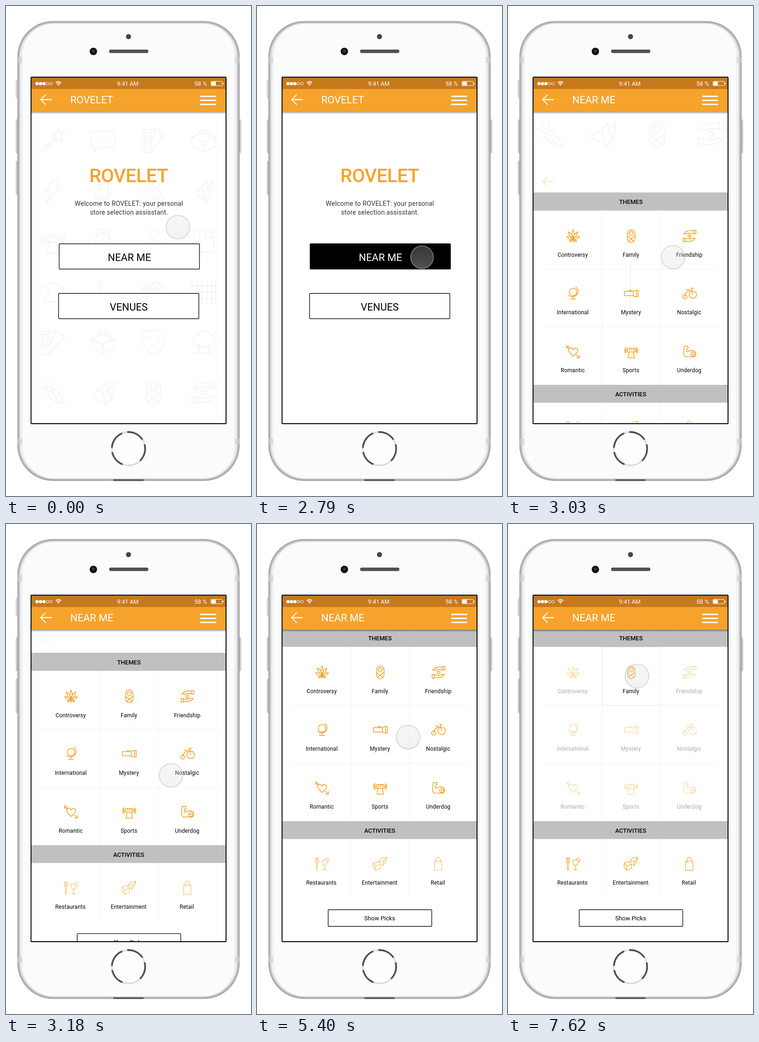
These frames come from a looping animation (530 px wide and 1057 px high, 8 s). An HTML page:

```html
<!DOCTYPE html>
<html lang="en">
<head>
<meta charset="utf-8">
<title>Store finder</title>
<style>
html, body { margin: 0; height: 100%; overflow: hidden; background: #fff; }
svg { display: block; width: 100vw; height: 100vh; font-family: Roboto, Inter, sans-serif; }
.mid { text-anchor: middle; }
.line { fill: none; stroke-linecap: round; stroke-linejoin: round; }
.line path { vector-effect: non-scaling-stroke; }
.label { font-size: 12px; letter-spacing: .15px; }
.section { font-size: 13px; font-weight: 500; }
</style>
</head>
<body>
<svg viewBox="0 0 530 1057">
  <defs>
    <clipPath id="view"><rect x="55" y="228" width="420" height="672"/></clipPath>
    <clipPath id="body"><rect x="24.5" y="32.5" width="481" height="992" rx="77"/></clipPath>
    <filter id="soft"><feGaussianBlur stdDeviation="2.2"/></filter>
    <filter id="polish"><feGaussianBlur stdDeviation=".7"/></filter>
    <linearGradient id="shade" x2="0" y2="1">
      <stop offset="0" stop-color="#000" stop-opacity=".38"/><stop offset="1" stop-color="#000" stop-opacity="0"/>
    </linearGradient>
    <linearGradient id="glass" x2="0" y2="1">
      <stop offset="0" stop-color="#ddd" stop-opacity=".25"/><stop offset="1" stop-color="#ddd" stop-opacity=".36"/>
    </linearGradient>
    <path id="back" d="M99 202H75M86 191L75 202L86 213" fill="none" stroke-width="2.3"/>
  </defs>

  <g fill="#e4e4e6" stroke="#a9a9ab">
    <rect x="22" y="160" width="6" height="38" rx="2"/>
    <rect x="22" y="245" width="6" height="72" rx="2"/>
    <rect x="22" y="334" width="6" height="73" rx="2"/>
    <rect x="502" y="245" width="6" height="72" rx="2"/>
  </g>
  <path d="M24.5 246V316M24.5 335V406M505.5 246V316" stroke="#666"/>
  <g clip-path="url(#body)">
    <rect x="24.5" y="32.5" width="481" height="992" fill="#f4f4f5"/>
    <rect x="25" y="33" width="480" height="991" rx="77" fill="none" stroke="#a2a2a4" stroke-width="8" filter="url(#soft)"/>
    <path d="M25 110h11v14H25zM494 110h11v14h-11zM25 933h11v13H25zM494 933h11v13h-11z" fill="#cfcfd1" opacity=".6"/>
  </g>
  <rect x="35.5" y="38" width="459" height="981" rx="68" fill="#fafbfd" stroke="#ececee"/>
  <rect x="232" y="1021" width="66" height="3.5" rx="1.5" fill="#555"/>
  <circle cx="265" cy="66" r="5.5" fill="#454547"/>
  <circle cx="189" cy="98" r="8" fill="#111"/>
  <circle cx="189" cy="97" r="3" fill="#3a3a42"/>
  <rect x="223" y="94" width="85" height="7.5" rx="3.7" fill="#505052"/>
  <g fill="none" stroke-width="3.6">
    <circle cx="265" cy="955" r="36" fill="#fdfdff" stroke="#dcdcdd"/>
    <circle cx="265" cy="955" r="36" stroke="#4a4a4c" pathLength="100" stroke-dasharray="17 18 16 4 18 5 17 5"
      transform="rotate(-15 265 955)" filter="url(#polish)"/>
  </g>
  <rect x="54" y="153" width="422" height="748" fill="#fff"/>

  <g clip-path="url(#view)">
    <g id="home">
      <g id="pattern" class="line" stroke="#f4f4f4" stroke-width="2"></g>
      <text class="mid" x="265.5" y="380" font-size="41" font-weight="500" letter-spacing="-.5" fill="#f5a32c">ROVELET</text>
      <g class="mid" font-size="14" letter-spacing=".2" fill="#333">
        <text x="266" y="431">Welcome to ROVELET: your personal</text>
        <text x="266" y="450">store selection assisstant.</text>
      </g>
      <g class="mid" font-size="22">
        <rect x="115" y="513" width="303.5" height="54.5" rx="1.5" fill="#fff" stroke="#111" stroke-width="1.4"/>
        <text x="267" y="550">NEAR ME</text>
        <g id="pressed">
          <rect x="114.5" y="512.5" width="304.5" height="55.5" rx="1.5"/>
          <text x="267" y="550" fill="#fff">NEAR ME</text>
        </g>
        <rect x="113.7" y="620" width="303.5" height="54.5" rx="1.5" fill="#fff" stroke="#111" stroke-width="1.4"/>
        <text x="265.5" y="657">VENUES</text>
      </g>
    </g>
    <g id="near">
      <g id="ghost">
        <use href="#back" stroke="#f5a32c"/>
      </g>
      <path d="M55 226h420v39H55zM55 641h420v38.5H55z" fill="#c0c0c0"/>
      <g class="mid section">
        <text x="266" y="251">THEMES</text>
        <text x="265.5" y="666">ACTIVITIES</text>
      </g>
      <path d="M203.5 265V641M329.5 265V641M202.5 680V803M328.5 680V803M76 391H455M76 516H455" stroke="#f0f0f0" fill="none"/>
      <path id="streak" d="M265 376V473" stroke="#eee" stroke-width="2"/>
      <rect id="chosen" x="204" y="265.5" width="125.5" height="125.5" fill="none" stroke="#e8e8e8"/>
      <g id="tiles" class="mid label"></g>
      <rect x="154" y="832" width="224" height="36" rx="1.5" fill="#fff" stroke="#111" stroke-width="1.4"/>
      <text class="mid" x="265.5" y="855" font-size="13">Show Picks</text>
    </g>
    <rect x="55" y="228" width="420" height="5" fill="url(#shade)"/>
  </g>

  <rect x="55" y="154" width="420" height="25.5" fill="#c7791d"/>
  <rect x="55" y="179" width="420" height="49" fill="#f5a32c"/>
  <g fill="#fff">
    <circle cx="67" cy="167.5" r="3.5"/><circle cx="74.5" cy="167.5" r="3.5"/><circle cx="82" cy="167.5" r="3.5"/>
    <g fill="none" stroke="#fff">
      <circle cx="89.7" cy="167.5" r="3"/><circle cx="97.5" cy="167.5" r="3"/>
      <path d="M107.5 165.5Q113.5 160.5 119.5 165.5M109.7 168Q113.5 165 117.3 168" stroke-width="1.7"/>
      <rect x="443.5" y="162.5" width="24.5" height="9.5" rx="1.5"/>
    </g>
    <path d="M111.5 169.5Q113.5 168 115.5 169.5L113.5 172ZM444.5 163.5H454V171H444.5ZM469 165.5h1.5v4H469z"/>
    <text class="mid" x="263.5" y="172" font-size="12.5">9:41 AM</text>
    <text x="407.5" y="172" font-size="13">58 %</text>
    <g font-size="22">
      <text id="title1" x="139" y="209.5">ROVELET</text>
      <text id="title2" x="139" y="209.5">NEAR ME</text>
    </g>
    <path d="M420 193.5h34.500v3H420zM420 202h34.500v3H420zM420 210.700h34.500v3H420z"/>
  </g>
  <use href="#back" stroke="#fff3e0"/>
  <rect x="54.2" y="153.5" width="421.8" height="747.5" rx="1" fill="none" stroke="#000" stroke-width="2"/>
  <g id="touch">
    <circle r="25.5" fill="url(#glass)" stroke="#bdbdbd" stroke-opacity=".5" stroke-width="2.2"/>
  </g>
</svg>
<script>
const $ = id => document.getElementById(id);

// Line icons, drawn around the origin within about 12 units
const icons = {
  wand: 'M-12 11L3-4M-10 12L5-2M6-12L7.5-7.5L12-8L8.5-4.5L10 1L5.5-2L1 0L2.5-4.5L-1-8L4-8Z',
  speech: 'M-12-9H12V7H-4L-9 11V7H-12ZM-5-1h1M0-1h1M5-1h1',
  swatch: 'M-11-11H-3V12H-11ZM-9-8h4v5h-4ZM-9 0h4v5h-4ZM-3-10L3-12L12-6L-3 12M3-12L-3 3M-7 8v1',
  toolbox: 'M-12-3L0-8L12-3V6L0 11L-12 6ZM-12-3L0 2L12-3M0 2V11M-5-6V-9L0-11L6-9V-6M-3 1v3l3 1',
  bolt: 'M0-11H7L3-3H8L-6 12L-2 1H-8Z',
  mic: 'M-5-7a5 5 0 0 1 10 0V1a5 5 0 0 1-10 0ZM-8-1V1a8 8 0 0 0 16 0V-1M0 9V12M-4 12H4M-5-6h5M-5-2h5',
  popper: 'M-4 4Q-6-4 4-3L12 11Q6 12-4 4M-2-2L8 11M-12-4q4-2 6 3M-8-11l3 6M-1-11q2 3-1 6M-11 3l2 1',
  bird: 'M-12 2L-2-4L4-10L5-3L12-11L9 5L3 12ZM-2-4L3 12M5-3L9 5',
  sports: 'M-12-6V2M-10-8V4M10-8V4M12-6V2M-10-2H-7M7-2H10M-7-6H7V1H-7ZM-3-6V-2M0-6V-2M4-6V-2M-4 1L-6 12H6L4 1',
  watch: 'M-5-12H5L6-6M-5-12L-6-6M-5 12H5L6 6M-5 12L-6 6M8 0A8 8 0 1 1-8 0A8 8 0 1 1 8 0M0-4V0H3',
  person: 'M4-7a4 4 0 1 1-8 0a4 4 0 1 1 8 0M-10 12V4Q-9 0 0 0T10 4V12Z',
  book: 'M-10-11H10V11H-10ZM-4-11V11M2-11V-3L5-5L8-3V-11',
  fist: 'M-8 10V5Q-13 1-11-5Q-8-8-6-6Q-4-11 0-8Q4-10 5-6Q10-8 11-3Q13 3 7 7V10ZM-5-5Q-3 0-6 2',
  phone: 'M-10-8L-6-10L-2-4L-5-1Q-2 5 4 6L7 3L12 7L9 11Q-8 10-10-8Z',
  diamond: 'M-6-9H6L12-2L0 11L-12-2ZM-12-2H12M-6-9L-4-2L0 11L4-2L6-9M-4-2L0-9L4-2',
  shelf: 'M-12-12V12M-7-12V12M-2-12V12M3-12V12M8-12V12M12-12V12M-12-6H12M-12 0H12M-12 7H12',
  mask: 'M-11-10Q0-14 11-10V0Q10 8 0 12Q-10 8-11 0ZM-7-4q2-2 4 0M3-4q2-2 4 0M-4 5Q0 1 4 5M6-1v3',
  cloud: 'M-5 2H-7Q-12 2-11-4Q-9-7-6-7Q-4-12 2-11Q6-11 7-7Q12-7 12-2Q11 2 7 2H4L5 10M-5 2H-4L-5 10M-9 11H9M-8 5H8',
  baby: 'M7-5A7 7 0 1 0-7-5V5A7 7 0 0 0 7 5ZM4-5a4 4 0 1 1-8 0a4 4 0 1 1 8 0M-7 0L5 10M7 0L-5 9M-1.5-6v.5M1.5-6v.5',
  hands: 'M12-11H8V-4H12ZM8-10H-2Q-8-8-11-4H-4L0-6M8-5H0M-12 11H-8V4H-12ZM-8 10H2Q8 8 11 4H4L0 6M-8 5H0M0 3L-3 0Q-3-3 0-1.5Q3-3 3 0Z',
  leaf: 'M0 6Q-4-3 0-12Q4-3 0 6M0 6Q-7 1-9-8Q0-4 0 6Q0-4 9-8Q7 1 0 6M0 6Q-8 7-12 1Q-4 0 0 6Q4 0 12 1Q8 7 0 6Q-5 7-7 10Q-3 11 0 6Q3 11 7 10Q5 7 0 6V12',
  globe: 'M7-3A7 7 0 1 1-7-3A7 7 0 1 1 7-3M5-12Q11-8 9-1Q6 6-2 6Q-6 6-8 3M0 6V10M-5 10.5H5',
  torch: 'M-13-4H4V4H-13ZM4-4L6-6H10V6H6L4 4M10-6H13V6H10M-4-4V-6H0V-4',
  bike: 'M13 2A7 7 0 1 1-1 2A7 7 0 1 1 13 2M-5 6A4 4 0 1 1-13 6A4 4 0 1 1-5 6M-9 6Q-8-5 4-6L6 2M2-10H8M4-6V-10M-6-7H-1',
  heart: 'M0 9L-8 0Q-10-6-5-7Q-2-7 0-3Q2-7 6-6Q10-4 8 1ZM-12-9L-6-5M-9-11V-7H-13M-12-9V-12M6 6L12 12M12 7V12H7',
  muscle: 'M-10-10H-3V-5L-6-4L-5 1Q4-4 10 0Q14 5 9 10H-8Q-12 8-11 0ZM10 5a4 4 0 1 1-8 0a4 4 0 1 1 8 0M4.5 5h3M6 3.5v3',
  dining: 'M-12-11H-6V-3H-12ZM-10-11V-5M-8-11V-5M-10-3V12H-8V-3M1-7H10Q11 3 5.5 3Q0 3 1-7M5.5 3V11M2 11H9M7-7A3.5 3.5 0 1 1 10-4',
  dice: 'M-13-1L-4-4L1 1V9L-8 12L-13 6ZM-13-1L-8 4L1 1M-8 4V12M-2-4L3-11L13-12L10-2L4 4M-2-4L7-5L13-12M7-5L4 4M-4 0h.1M-4 7h.1M-11 5h.1M5-8h.1M9-4h.1',
  bag: 'M-7-5H7V12H-7ZM-4-2V-8Q-4-12 0-12Q4-12 4-8V-2',
};

const pattern = ('wand speech swatch toolbox bolt mic popper bird sports watch person book ' +
  'fist phone diamond shelf swatch toolbox mask cloud popper bird baby hands').split(' ');
$('pattern').innerHTML = pattern.map(n => `<path d="${icons[n]}"/>`).join('');
const patternPaths = [...$('pattern').children];
// Index and start time of each pattern icon that flips
const flips = {2: -100, 7: -150, 11: 1800, 13: -180, 18: 1750};

const tiles = [
  ['leaf', 'Controversy'], ['baby', 'Family'], ['hands', 'Friendship'],
  ['globe', 'International'], ['torch', 'Mystery'], ['bike', 'Nostalgic'],
  ['heart', 'Romantic'], ['sports', 'Sports'], ['muscle', 'Underdog'],
  ['dining', 'Restaurants'], ['dice', 'Entertainment'], ['bag', 'Retail'],
];
const rowY = [320, 444, 569, 733];
$('tiles').innerHTML = tiles.map(([name, label], i) => {
  const x = 140 + i % 3 * 126 - (i > 8 ? .7 : 0), y = rowY[i / 3 | 0];
  return `<g><g class="line" stroke="#f2a32f" stroke-width="${i > 8 ? 1.2 : 1.6}"
    transform="translate(${x + .7} ${y}) scale(1.15)"><path d="${icons[name]}"/></g>
    <text x="${x}" y="${y + 45}">${label}</text></g>`;
}).join('');
const tileGroups = [...$('tiles').children];

const ramp = (t, from, to) => Math.min(1, Math.max(0, (t - from) / (to - from)));
const easeOut = (p, power) => 1 - (1 - p) ** power;
const mix = (a, b, p) => a + (b - a) * p;
const fade = (id, value) => $(id).setAttribute('opacity', value);
const place = (el, value) => el.setAttribute('transform', value);

function draw(t) {
  const push = easeOut(ramp(t, 2800, 3720), 5);
  place($('home'), `translate(0 ${-748 * push})`);
  place($('near'), `translate(0 ${748 * (1 - push)})`);
  fade('title1', 1 - ramp(t, 2800, 2920));
  fade('title2', ramp(t, 2800, 2920));
  fade('ghost', 1 - push);
  fade('streak', Math.min(1, 4 * (1 - push)));
  fade('pressed', ramp(t, 2490, 2640));

  fade('pattern', 1 - ramp(t, 2520, 2700) + ramp(t, 2820, 2940));
  const zoom = 1 + .089 * push;
  place($('pattern'), `translate(265 630) scale(${zoom}) translate(-265 -630)`);
  patternPaths.forEach((path, i) => {
    const p = i in flips ? ramp(t, flips[i], flips[i] + 600) : 0;
    const sx = 2.15 * Math.max(.04, Math.abs(Math.cos(Math.PI * p)));
    place(path, `translate(${101 + i % 4 * 109} ${290 + (i / 4 | 0) * 108.8}) scale(${sx} 2.15)`);
  });

  const pick = ramp(t, 7200, 7620);
  tileGroups.forEach((g, i) => {
    if (i > 8) g.firstChild.setAttribute('opacity', mix(.7, 1, pick));
    else if (i !== 1) g.setAttribute('opacity', mix(1, .34, pick));
  });
  fade('chosen', pick);

  const first = easeOut(ramp(t, 1710, 2490), 2), second = easeOut(ramp(t, 5130, 6390), 2);
  const x = mix(mix(372, 357, first), 279, second);
  const y = mix(mix(477, 542, first), 328, second);
  const press = ramp(t, 2490, 2640) - ramp(t, 2790, 2940);
  place($('touch'), `translate(${x} ${y}) scale(${1 - .04 * press})`);
}

const start = performance.now();
function tick() {
  draw((performance.now() - start) % 8000);
  requestAnimationFrame(tick);
}
tick();
</script>
</body>
</html>
```
